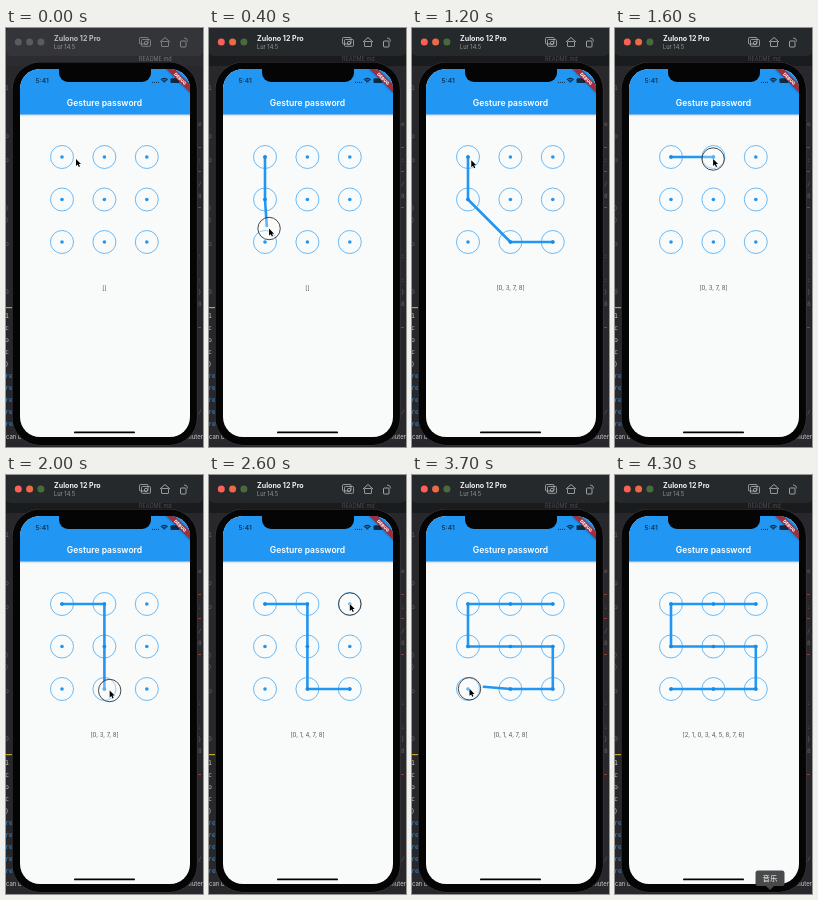
Write an HTML page with a canvas that moves like this. It is 197 by 419 pixels and loops after 4.4 s.

```html
<!DOCTYPE html>
<html lang="en">
<head>
<meta charset="utf-8">
<title>Gesture password</title>
<style>
html, body { margin: 0; width: 100%; height: 100%; overflow: hidden; background: #242427; }
canvas { display: block; width: 197px; height: 419px; }
</style>
</head>
<body>
<canvas id="stage"></canvas>
<script>
const W = 197, H = 419, LOOP = 4400, STEP = 100, LAG = 50;
const BLUE = '#2196f3', BLACK = '#050506', INK = '#0d2b45';
const SANS = 'Inter, Roboto, sans-serif', MONO = '"DejaVu Sans Mono", monospace';
const CJK = '"Noto Sans CJK SC", "Noto Sans CJK", sans-serif';
const canvas = document.getElementById('stage');
const ctx = canvas.getContext('2d');
const dpr = window.devicePixelRatio || 1;
canvas.width = W * dpr;
canvas.height = H * dpr;

const RADIUS = 11.5;
const nodes = Array.from({ length: 9 }, (_, i) => ({ x: 56 + 42.4 * (i % 3), y: 129 + 42.5 * Math.floor(i / 3) }));
const at = i => nodes[i];

const strokes = [
  { start: 100, end: 790, route: [at(0), { x: 58, y: 199 }, at(7), at(8)] },
  { start: 1300, end: 2207, route: [0, 1, 7, 8].map(at) },
  { start: 2600, end: 3720, route: [2, 0, 3, 5, 8, 6].map(at) }
];
const EXIT = { x: 155, y: 418, time: 4200 };

const smooth = p => p * p * (3 - 2 * p);
const easeOut = p => 1 - (1 - p) ** 2;
const span = (a, b) => Math.hypot(b.x - a.x, b.y - a.y);

// The hand slows at each corner and bows a little between corners.
function buildMoves() {
  const moves = [];
  let hand = { x: 70, y: 131 }, time = 0;
  const add = (to, t1, ease, bow) => {
    moves.push({ from: hand, to, t0: time, t1, ease, bow });
    hand = to;
    time = t1;
  };
  for (const { start, end, route } of strokes) {
    add(route[0], start, easeOut, 0);
    const effort = route.slice(1).map((p, i) => Math.sqrt(span(route[i], p)));
    const total = effort.reduce((a, b) => a + b);
    effort.forEach((e, i) => add(route[i + 1], time + (end - start) * e / total, smooth, 4));
  }
  add(EXIT, EXIT.time, smooth, 0);
  return moves;
}
const moves = buildMoves();

function pointer(t) {
  const { from, to, t0, t1, ease, bow } = moves.find(m => t < m.t1) || moves[moves.length - 1];
  const p = ease(Math.min(1, (t - t0) / (t1 - t0)));
  const dx = to.x - from.x, dy = to.y - from.y;
  const side = bow * Math.sin(Math.PI * p) / span(from, to);
  return { x: from.x + dx * p - dy * side, y: from.y + dy * p + dx * side };
}

// nodes crossed between two times
function crossed(from, to) {
  const hits = [];
  for (let t = from; t <= to; t += 5) {
    const hand = pointer(t);
    const i = nodes.findIndex(n => span(n, hand) < RADIUS);
    if (i >= 0 && !hits.includes(i)) hits.push(i);
  }
  return hits;
}

function gesture(t) {
  const state = { path: [], tail: null, label: '[]', down: false };
  for (const { start, end } of strokes) {
    if (t >= start && t < end) state.down = true;
    if (t - LAG < start) break;
    state.path = crossed(start, Math.min(t - LAG, end));
    state.tail = t < end ? pointer(t - LAG) : null;
    if (t >= end) state.label = `[${state.path.join(', ')}]`;
  }
  return state;
}

function random(seed) {
  return () => (seed = seed * 16807 % 2147483647) / 2147483647;
}

function text(s, x, y, size, color, { weight = 400, align = 'left', family = SANS } = {}) {
  ctx.font = `${weight} ${size}px ${family}`;
  ctx.fillStyle = color;
  ctx.textAlign = align;
  ctx.fillText(s, x, y);
}

function rect(x, y, w, h, color) {
  ctx.fillStyle = color;
  ctx.fillRect(x, y, w, h);
}

function box(x, y, w, h, r, color) {
  ctx.beginPath();
  ctx.roundRect(x, y, w, h, r);
  ctx.fillStyle = color;
  ctx.fill();
}

function frame(x, y, w, h, r) {
  ctx.beginPath();
  ctx.roundRect(x, y, w, h, r);
  ctx.stroke();
}

function disc(x, y, r, color) {
  ctx.beginPath();
  ctx.arc(x, y, r, 0, 7);
  ctx.fillStyle = color;
  ctx.fill();
}

function arc(x, y, r, color, width, from = 0, to = 2 * Math.PI) {
  ctx.beginPath();
  ctx.arc(x, y, r, from, to);
  ctx.strokeStyle = color;
  ctx.lineWidth = width;
  ctx.stroke();
}

function line(points, color, width) {
  ctx.beginPath();
  points.forEach(p => ctx.lineTo(p.x, p.y));
  ctx.strokeStyle = color;
  ctx.lineWidth = width;
  ctx.stroke();
}

// slivers of code on both sides of the phone
function drawEditor(focused) {
  rect(0, 0, W, H, '#28282c');
  rect(0, 26, W, 12, focused ? '#1a1b1d' : '#2c2c30');
  text('README.md', 133, 33, 5.5, focused ? '#4b4b50' : '#77777d');
  const rnd = random(41);
  for (let y = 62; y < 400; y += 12) {
    const low = y > 284;
    const color = y > 346 ? '#3a8fd6' : low ? '#c8c8ca' : '#606066';
    if (low || rnd() < 0.4) text(y > 346 ? 're' : 'co10)po'[Math.floor(rnd() * 7)], -1, y, 6.5, color, { family: MONO });
    if (rnd() < 0.35) text('e/8:}'[Math.floor(rnd() * 5)], 192, y, 6, '#606066', { family: MONO });
    if (rnd() < 0.15) rect(192, y - 3, 3, 1, '#8a4038');
  }
  rect(0, 279, 6, 1.2, '#c9a227');
  text('can be', 0, 411, 6, '#c8c8ca');
  text('muter', W, 411, 6, '#c8c8ca', { align: 'right' });
}

function drawTitleBar(focused) {
  box(0, 0, W, 28, 5, focused ? '#25292b' : '#343538');
  ['#fe5f57', '#ee6a45', '#486b3a'].forEach((c, i) => disc(12.3 + 11.3 * i, 14, 3.5, focused ? c : '#5b5b5e'));
  text('Zulono 12 Pro', 48, 13, 7.1, focused ? '#f0f0f0' : '#bcbcbe', { weight: 700 });
  text('Lur 14.5', 48, 21, 5.7, '#98989b');

  const color = focused ? '#b2b2b5' : '#909093';
  arc(140, 15, 1.7, color, 0.8);
  frame(135.5, 11.5, 9, 6.8, 1);
  frame(133.5, 9.5, 8.5, 6.5, 1);
  frame(155.5, 13.5, 7, 5, 0.5);
  line([{ x: 154, y: 14 }, { x: 159, y: 9.5 }, { x: 164, y: 14 }], color, 0.9);
  frame(174.5, 13, 5.5, 6, 0.8);
  arc(178, 13.5, 3.6, color, 0.8, -Math.PI / 2, 0);
}

function drawBanner() {
  ctx.save();
  ctx.translate(184, 41);
  ctx.rotate(Math.PI / 4);
  ctx.shadowColor = 'rgba(0,0,0,.5)';
  ctx.shadowBlur = 2.5 * dpr;
  rect(-17.5, 11.2, 35, 5.3, '#a12c3c');
  ctx.shadowBlur = 0;
  text('DEBUG', 0, 15.4, 4.4, '#fff', { weight: 800, align: 'center' });
  ctx.restore();
}

function drawHeader() {
  const shade = ctx.createLinearGradient(0, 86, 0, 89);
  shade.addColorStop(0, 'rgba(0,0,0,.16)');
  shade.addColorStop(1, 'rgba(0,0,0,0)');
  rect(14, 86, 170, 3, shade);
  rect(14, 41, 170, 45.5, BLUE);
  text('5:41', 29.5, 55, 6.8, INK, { weight: 500 });
  for (let i = 0; i < 4; i++) {
    disc(146.5 + 2 * i, 54.3, 0.6, INK);
    if (i) arc(158.3, 55.2, 1.6 * i, INK, 1.1, -Math.PI * 0.75, -Math.PI * 0.25);
  }
  box(164.5, 50.3, 9, 4.8, 1.2, INK);
  drawBanner();
  box(53, 38, 92, 16, [0, 0, 9, 9], BLACK);
  text('Gesture password', 98.5, 77.5, 8.55, '#fff', { weight: 600, align: 'center' });
}

function drawPattern({ path, tail }) {
  for (const { x, y } of nodes) {
    arc(x, y, RADIUS, BLUE, 0.65);
    disc(x, y, 1.8, BLUE);
  }
  const points = path.map(at);
  if (tail && points.length) points.push(tail);
  ctx.lineCap = ctx.lineJoin = 'round';
  line(points, BLUE, 2.6);
  ctx.lineCap = 'butt';
  path.map(at).forEach(({ x, y }) => disc(x, y, 1.8, '#1c8ae2'));
}

function drawPhone(state) {
  box(6, 34, 185.5, 383.5, 28, '#3c3c3f');
  box(6.6, 34.6, 184.3, 382.3, 27, BLACK);
  ctx.save();
  ctx.beginPath();
  ctx.roundRect(14, 41, 170, 368, 20);
  ctx.clip();
  rect(14, 41, 170, 368, '#f8fbfa');
  drawHeader();
  drawPattern(state);
  text(state.label, 98.5, 262.3, 6, '#555', { align: 'center' });
  box(68, 403.5, 61, 1.8, 1, '#000');
  ctx.restore();
}

function drawPointer({ x, y }, down) {
  if (down) {
    disc(x, y, RADIUS, 'rgba(255,255,255,.3)');
    arc(x, y, 11.2, '#1a1a1a', 0.8);
  }
  const arrow = new Path2D('M0 0V7L1.7 5.6L2.8 8L4 7.5L2.9 5.1H5Z');
  ctx.save();
  ctx.translate(x, y);
  ctx.strokeStyle = '#fff';
  ctx.lineWidth = 1;
  ctx.stroke(arrow);
  ctx.fillStyle = '#000';
  ctx.fill(arrow);
  ctx.restore();
}

function drawTooltip() {
  box(140.5, 395.5, 29, 15.5, 2.5, '#4a4a4c');
  ctx.fill(new Path2D('M151 411L155 415L159 411Z'));
  text('音乐', 155, 406.2, 7.4, '#fff', { weight: 500, align: 'center', family: CJK });
}

function draw(now) {
  const t = Math.floor((now % LOOP) / STEP) * STEP;
  const focused = t >= strokes[0].start;
  const state = gesture(t);
  ctx.setTransform(dpr, 0, 0, dpr, 0, 0);
  drawEditor(focused);
  drawTitleBar(focused);
  drawPhone(state);
  if (t < EXIT.time) drawPointer(pointer(t), state.down);
  else drawTooltip();
}

let origin = null;
function tick(now) {
  origin ??= now;
  draw(now - origin);
  requestAnimationFrame(tick);
}
draw(0);
requestAnimationFrame(tick);
</script>
</body>
</html>
```
